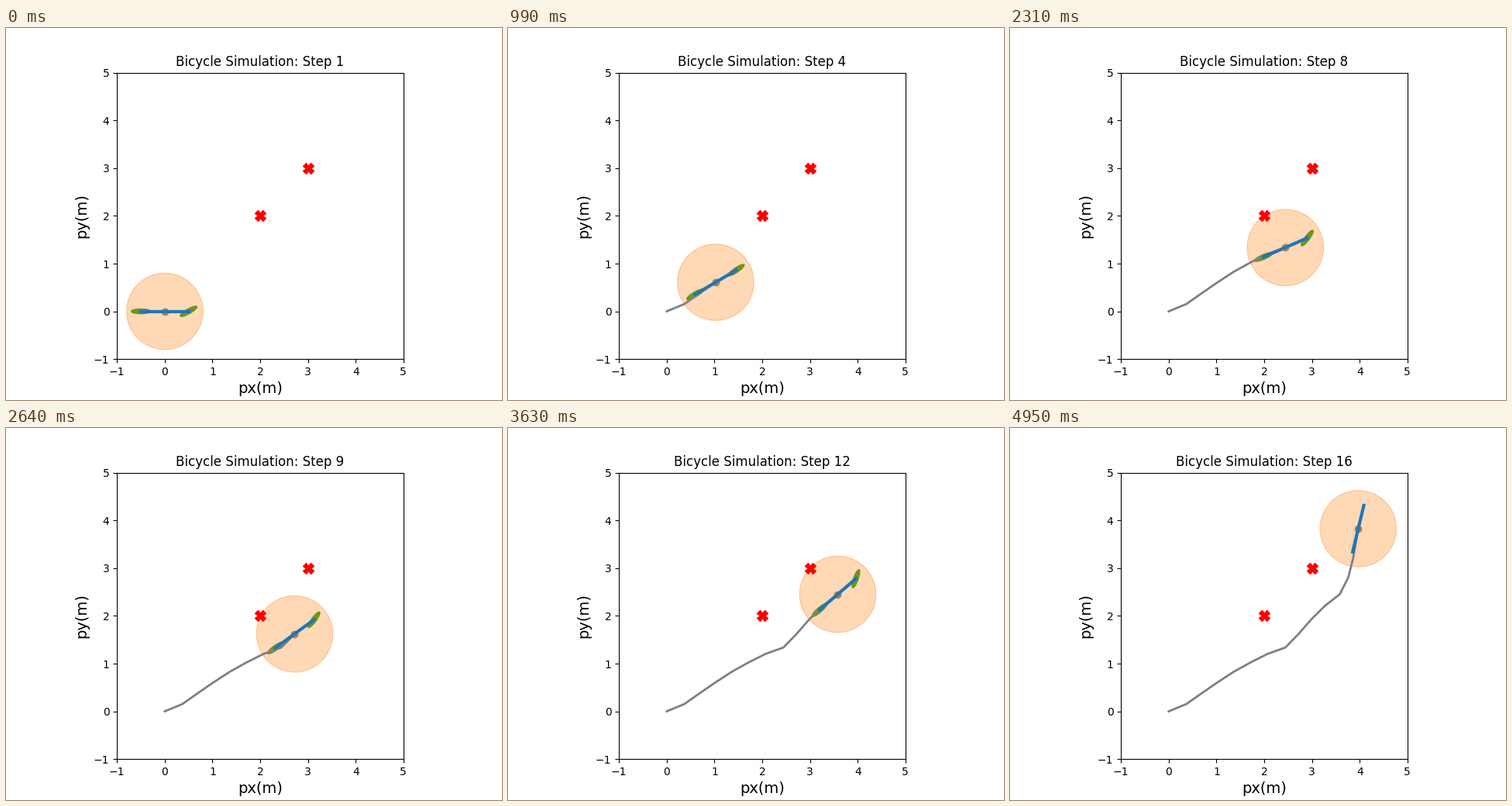
Animation of 640x480 px, one loop 5280 ms. Source, as a matplotlib script:

```python
import math

import matplotlib.pyplot as plt
from matplotlib.animation import FuncAnimation
from matplotlib.patches import Circle, Ellipse

STEP_MS = 330
AXLE = 0.5          # distance from the centre to each wheel
RADIUS = 0.8
TRAVEL = 0.4        # distance covered in one step
LAST_TRAVEL = 0.24
OBSTACLES = [(2, 2), (3, 3)]

# steering angle in degrees, one per step
STEER = [30, 30, 12.8, 3.6, -4.2, -5.2, -12.1, 30,
         17.8, 2, -8.6, 30, 30, 19.4, 9.9]


def advance(x, y, heading, steer, dist):
    """Kinematic bicycle: follow the arc given by a constant steering angle."""
    slip = math.atan(0.5 * math.tan(steer))
    turn = dist / AXLE * math.sin(slip)
    chord = dist * math.sin(turn / 2) / (turn / 2)
    course = heading + slip + turn / 2
    return (x + chord * math.cos(course),
            y + chord * math.sin(course),
            heading + turn)


def simulate():
    states = [(0.0, 0.0, 0.0)]
    for i, deg in enumerate(STEER):
        dist = LAST_TRAVEL if i == len(STEER) - 1 else TRAVEL
        states.append(advance(*states[-1], math.radians(deg), dist))
    return states


STATES = simulate()

fig, ax = plt.subplots(figsize=(6.4, 4.8), dpi=100)


def add_wheel(x, y, angle):
    ax.add_patch(Ellipse((x, y), 0.4, 0.1, angle=angle, color="C2"))


def draw(i):
    ax.clear()
    ax.set_aspect("equal")
    ax.set_xlim(-1, 5)
    ax.set_ylim(-1, 5)
    ax.set_xlabel("px(m)", fontsize=14)
    ax.set_ylabel("py(m)", fontsize=14)
    ax.set_title(f"Bicycle Simulation: Step {i + 1}")

    x, y, heading = STATES[i]
    dx, dy = AXLE * math.cos(heading), AXLE * math.sin(heading)

    # no steering command is left at the final step, so no wheels there
    if i < len(STEER):
        angle = math.degrees(heading)
        add_wheel(x - dx, y - dy, angle)
        add_wheel(x + dx, y + dy, angle + STEER[i])

    ax.scatter(x, y, color="gray", zorder=1)
    ax.add_patch(Circle((x, y), RADIUS, color="C1", alpha=0.3))

    xs, ys, _ = zip(*STATES[:i + 1])
    ax.plot(xs, ys, color="gray", lw=2)
    ax.plot([x - dx, x + dx], [y - dy, y + dy], color="C0", lw=3)
    for ox, oy in OBSTACLES:
        ax.plot(ox, oy, "X", color="red", ms=10)
    return []


anim = FuncAnimation(fig, draw, frames=len(STATES), init_func=lambda: draw(0),
                     interval=STEP_MS, repeat=True, repeat_delay=0)
plt.show()
```
